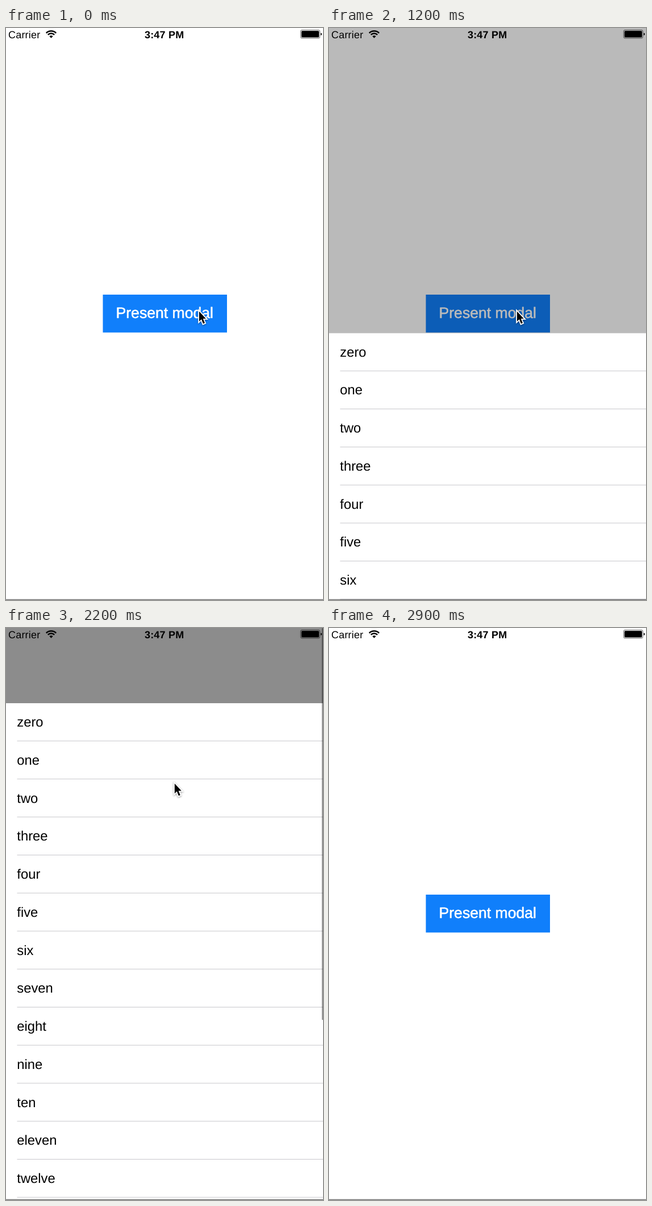
Write an HTML page that moves like this. It is 558 px wide and 1004 px high and loops after 3 s.

```html
<!DOCTYPE html>
<html lang="en">
<head>
<meta charset="utf-8">
<title>Modal sheet</title>
<style>
  html, body { margin: 0; width: 100%; height: 100%; overflow: hidden; background: #fff; }
  svg { display: block; width: 558px; height: 1004px; font-family: "Liberation Sans", Arial, sans-serif; text-rendering: geometricPrecision; }
  #label { font-size: 26.6px; fill: #fff; stroke: #fff; stroke-width: .6px; }
  #sheet text { font-size: 23.8px; }
  .status { font-size: 18px; letter-spacing: .2px; }
</style>
</head>
<body>
<svg viewBox="0 0 558 1004">
  <rect width="558" height="1004" fill="#fff"/>
  <rect x="170.5" y="468" width="218.5" height="66.5" fill="#107ffb"/>
  <text id="label" x="193.5" y="509">Present modal</text>
  <rect id="dim" width="558" height="1004"/>
  <g id="sheet"><rect width="558" height="1004" fill="#fff"/></g>
  <rect id="bar" x="556" width="3" height="688" rx="1.5" fill="#000" fill-opacity=".42"/>

  <g class="status">
    <text x="4" y="17.5">Carrier</text>
    <text x="278.7" y="17.5" text-anchor="middle" font-weight="bold">3:47 PM</text>
  </g>
  <g fill="none" stroke="#000" stroke-width="2.5">
    <path d="M70.8 8.8a12.3 12.3 0 0 1 17.4 0M73.8 11.8a8 8 0 0 1 11.4 0"/>
    <path d="M79.5 17.7l-3.1-3.1a4.4 4.4 0 0 1 6.2 0z" fill="#000" stroke="none"/>
  </g>
  <rect x="518.5" y="3.5" width="34" height="14.5" rx="2.5" fill="none" stroke="#000" stroke-opacity=".6"/>
  <rect x="520" y="5" width="31" height="11.5" rx="1.5"/>
  <path d="M554 8.5q2 .5 2 2.3t-2 2.3z"/>

  <path id="cursor" d="M0 0V17.5L4 13.8 7 21.5 10 20.2 6.8 12.8H12Z" stroke="#fff" stroke-width="3.6"
    paint-order="stroke" style="filter: drop-shadow(0 1px 1.5px rgba(0,0,0,.4))"/>
  <rect y="1002.6" width="558" height="1.4" fill="#777"/>
</svg>
<script>
const LOOP = 3000, STEP = 100, HEIGHT = 1004, REST = 132, ROW = 66.75;
const $ = id => document.getElementById(id);
const words = "zero one two three four five six seven eight nine ten eleven twelve".split(" ");

$("sheet").insertAdjacentHTML("beforeend", words.map((word, i) =>
  `<text x="19.3" y="${i * ROW + 41}">${word}</text>
   <rect x="19.5" y="${(i + 1) * ROW - 1}" width="539" height="1" fill="#c8c7cc"/>`).join(""));

// Smooth 0 to 1 from a start time; power below 1 brings the middle forward
function ease(t, start, duration, power = 1) {
  const p = Math.min(1, Math.max(0, (t - start) / duration)) ** power;
  return p * p * (3 - 2 * p);
}

const set = (id, name, value) => $(id).setAttribute(name, value);

function draw(now) {
  const t = Math.floor(now % LOOP / STEP) * STEP;

  // The sheet rises, is pulled down, then the whole view slides away
  const rise = ease(t, 945, 525, .893);
  const pull = 186 * ease(t, 2200, 200);
  const slide = HEIGHT * ease(t, 2268, 400);
  const top = HEIGHT - (HEIGHT - REST) * rise + pull + slide;
  set("sheet", "transform", `translate(0 ${top})`);
  set("dim", "opacity", .452 * (ease(t, 807, 692) - ease(t, 2248, 400)));
  set("bar", "y", slide);
  set("bar", "opacity", t < 2200 ? 0 : 1);

  // The pressed label fades back
  set("label", "opacity", t < 700 ? 1 : .35 + .65 * ease(t, 800, 300));

  // The pointer drifts, moves up to the list and speeds downwards
  const up = ease(t, 1800, 300);
  const down = 26 * (Math.max(0, t - 2100) / 100) ** 2.12;
  const x = 340 - 9 * ease(t, 100, 400) - 36 * up + .07 * down;
  set("cursor", "transform", `translate(${x} ${497.5 - 250.5 * up + down})`);
}

let start;
function tick(now) {
  start ??= now;
  draw(now - start);
  requestAnimationFrame(tick);
}
draw(0);
requestAnimationFrame(tick);
</script>
</body>
</html>
```
